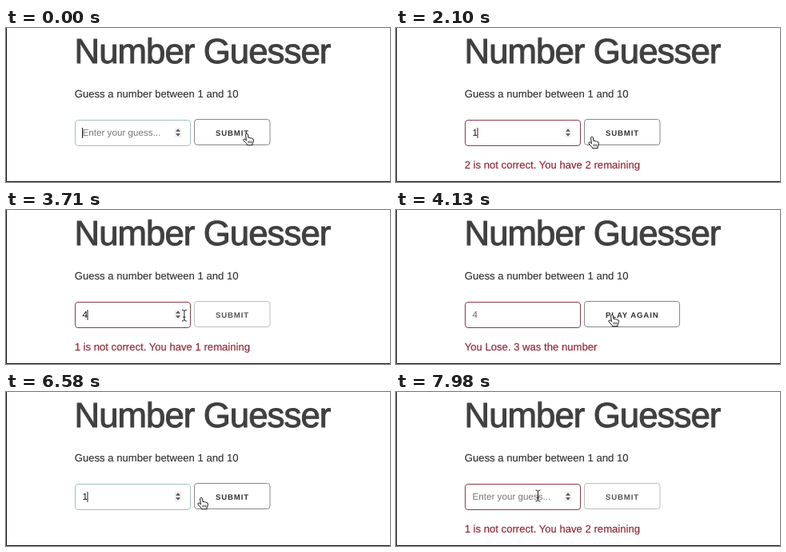
An HTML page for the animation above (8 s loop, 480 by 193 pixels).

```html
<!DOCTYPE html>
<html lang="en">
<head>
<meta charset="utf-8">
<title>Number Guesser</title>
<style>
  html, body { margin: 0; width: 100%; height: 100%; overflow: hidden; background: #fff; }
  svg { display: block; width: 480px; height: 193px; }
  text { font: 13.125px "Liberation Sans", Arial, sans-serif; fill: #333; stroke: #333; stroke-width: .15; text-rendering: geometricPrecision; white-space: pre; }
  #heading { font-size: 43.75px; letter-spacing: -.94px; fill: #404040; stroke: #404040; stroke-width: 1; }
  #value { font-size: 11.667px; stroke: none; }
  #label { font-size: 9.625px; font-weight: bold; letter-spacing: .875px; stroke: none; }
  #message { fill: #96303d; stroke: #96303d; stroke-width: .25; }
  .box { fill: #fff; stroke-width: 1; }
  .cursor { fill: #fff; stroke: #111; stroke-width: 1; stroke-linejoin: round; }
  #beam { fill: none; stroke: #222; stroke-width: 1; }
</style>
</head>
<body>
<svg viewBox="0 0 480 193">
  <rect width="480" height="193" fill="#fff"/>
  <path d="M.5 0V192.5H480" fill="none" stroke="#111"/>
  <text id="heading" x="85.5" y="43.7">Number Guesser</text>
  <text x="85.7" y="86.6">Guess a number between 1 and 10</text>

  <rect id="field" class="box" x="86.5" y="115.5" width="144" height="32" rx="3.5"/>
  <text id="value" x="95.5" y="135"></text>
  <rect id="caret" y="125" width="1" height="13" fill="#222"/>
  <g id="spinner">
    <rect x="210.5" y="124.5" width="9" height="13" rx="1" fill="#f3f3f3"/>
    <path d="M212 129.7L215 126.2L218 129.7ZM212 132.2L215 135.7L218 132.2Z" fill="#555"/>
  </g>

  <rect id="button" class="box" x="235.5" y="114.5" height="32" rx="3.5"/>
  <text id="label" x="261.9" y="134.8"></text>
  <text id="message" x="85.7" y="175.5"></text>

  <g id="hand" class="cursor">
    <path d="M-1.5 1.5Q0 -1 1.5 1.5L1.9 5.5Q3.3 4.6 4.2 6Q5.7 5.2 6.4 6.7Q8.5 6.3 8.4 8.8Q8.2 11.2 7 13V14.8H.5L.2 13.4Q-2.4 11.2 -4.2 8.6Q-4.5 6.7 -2.4 7.2L-.6 8.9Z"/>
    <path d="M2 9.6V12.4M3.9 9.6V12.4M5.7 9.6V12.4" stroke-width=".8"/>
  </g>
  <path id="beam" d="M-3 -7Q0 -7 0 -5.2Q0 -7 3 -7M0 -5.5V5.5M-3 7Q0 7 0 5.2Q0 7 3 7M-1.7 2H1.7"/>
  <path id="arrow" class="cursor" d="M0 0V13L3 10.3L5 15L7.2 14L5.2 9.6H9.3Z"/>
</svg>
<script>
const LOOP = 8000, TICK = 70;
const el = {};
for (const id of ["field", "value", "caret", "spinner", "button", "label", "message", "hand", "beam", "arrow"]) {
  el[id] = document.getElementById(id);
}

const wrong = (guess, left) => `${guess} is not correct. You have ${left} remaining`;

// Each entry changes the form state from its time on.
const events = [
  [0, { value: "", focus: true, caret: true, hide: false, message: "", error: false, over: false }],
  [420, { value: "2" }],
  [840, { value: "", focus: false }],
  [910, { message: wrong(2, 2), error: true }],
  [1750, { focus: true }],
  [1960, { value: "1" }],
  [2450, { value: "", focus: false, message: wrong(1, 1) }],
  [2870, { focus: true }],
  [3290, { value: "4", hide: true }],
  [3570, { hide: false }],
  [3850, { caret: false }],
  [4130, { focus: false, caret: true, over: true, message: "You Lose. 3 was the number" }],
  [5320, { value: "", message: "", error: false, over: false }],
  [6020, { focus: true }],
  [6230, { value: "1", hide: true }],
  [6440, { hide: false }],
  [6930, { value: "", focus: false, message: wrong(1, 2), error: true }],
  [7350, { focus: true }],
  [7910, { caret: false }]
];

// Pointer hotspot: time, x, y
const path = [
  [0, 301, 132], [350, 301, 132], [630, 293, 134], [1330, 293, 134],
  [1540, 238, 140], [1750, 185, 132], [1960, 185, 132], [2100, 245, 136],
  [2310, 272, 134], [2450, 272, 134], [2870, 187.5, 133], [3500, 187.5, 133],
  [3990, 270, 131], [5740, 270, 131], [6020, 186, 132], [6370, 186, 132],
  [6580, 244, 132], [6790, 272, 131], [7000, 272, 131], [7350, 177.5, 131],
  [7910, 177.5, 131], [7980, 177.5, 130]
];

function pointerAt(t) {
  const next = path.findIndex(p => p[0] > t);
  if (next < 0) return path[path.length - 1].slice(1);
  const [t0, x0, y0] = path[next - 1], [t1, x1, y1] = path[next];
  const k = (t - t0) / (t1 - t0);
  return [x0 + (x1 - x0) * k, y0 + (y1 - y0) * k];
}

function stateAt(t) {
  const s = {};
  for (const [at, change] of events) if (at <= t) Object.assign(s, change);
  return s;
}

const show = (node, on) => node.setAttribute("visibility", on ? "visible" : "hidden");

function draw(time) {
  const t = Math.floor((time % LOOP) / TICK) * TICK;
  const s = stateAt(t);
  const [x, y] = pointerAt(t);
  const width = s.over ? 119 : 94.5;
  const onField = x < 231;
  const onButton = x >= 235 && x <= 235 + width;

  el.field.style.stroke = s.error ? "#8a3a48" : s.focus ? "#a5c0c6" : "#c4c4c4";
  el.value.textContent = s.value || "Enter your guess...";
  el.value.style.fill = !s.value ? "#777" : s.over ? "#666" : "#111";
  el.caret.setAttribute("x", s.value ? 101.5 : 95);
  show(el.caret, s.focus && s.caret);
  show(el.spinner, s.focus || onField);

  el.button.setAttribute("width", width);
  el.button.style.stroke = onButton ? "#888" : "#bbb";
  el.label.textContent = s.over ? "PLAY AGAIN" : "SUBMIT";
  el.label.style.fill = onButton ? "#333" : "#555";
  el.message.textContent = s.message;

  const cursor = onField ? "beam" : onButton ? "hand" : "arrow";
  for (const id of ["hand", "beam", "arrow"]) {
    show(el[id], id === cursor && !(s.hide && onField));
    el[id].setAttribute("transform", `translate(${x} ${y})`);
  }
}

const start = performance.now();
function frame() {
  draw(performance.now() - start);
  requestAnimationFrame(frame);
}
frame();
</script>
</body>
</html>
```
